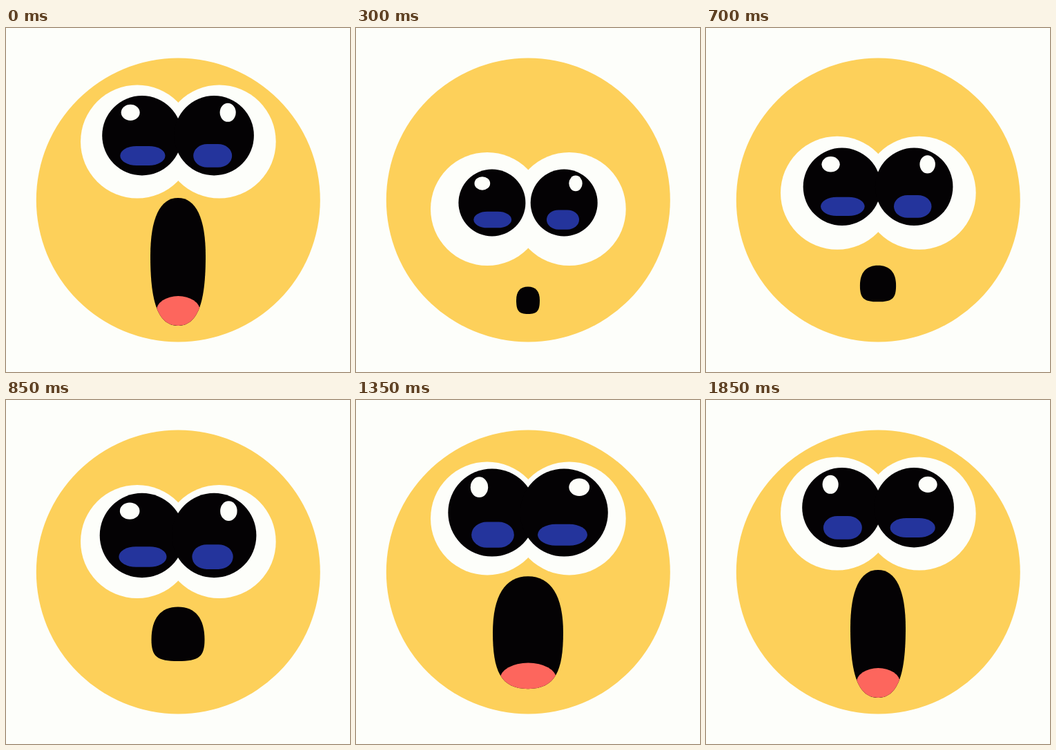
An HTML page that plays this animation: 498x498 px, repeating every 1900 ms.

```html
<!DOCTYPE html>
<html lang="en">
<head>
<meta charset="utf-8">
<title>Amazed face</title>
<style>
  html, body { margin: 0; width: 100%; height: 100%; overflow: hidden; background: #fdfefa; }
  svg { display: block; width: 100%; height: 100%; }
</style>
</head>
<body>
<svg id="stage" viewBox="0 0 498 498">
  <defs><clipPath id="mouthClip"><path id="mouthEdge"/></clipPath></defs>
  <circle cx="249.3" cy="249" r="205.5" fill="#fdd05a"/>
  <g id="whites" fill="#fdfefa">
    <circle cx="190" r="82"/>
    <circle cx="308.7" r="82"/>
  </g>
  <g id="pupils"></g>
  <path id="mouth" fill="#040204"/>
  <ellipse id="tongue" cx="249.3" fill="#fd665d" clip-path="url(#mouthClip)"/>
</svg>
<script>
const LOOP = 1900, STEP = 50, SWAP = 1350, MID = 249;
const byId = id => document.getElementById(id);

function set(node, attrs) {
  for (const name in attrs) node.setAttribute(name, attrs[name]);
}

function add(parent, tag, attrs) {
  const node = document.createElementNS('http://www.w3.org/2000/svg', tag);
  set(node, attrs);
  return parent.appendChild(node);
}

// One value per pose, at these times.
const times = [0, 150, 300, 500, 850, 1150, 1550, 1850];
const tracks = {
  whiteY:   [164.5, 220, 262, 276, 205, 180, 166.5, 164.5],
  pupilY:   [155.7, 211, 253, 267.5, 196, 171.5, 158, 155.7],
  pupilR:   [57.7, 52, 48.5, 49.5, 61.2, 63.8, 63, 57.7],
  top:      [246, 320, 374.5, 393, 299.5, 267, 248.5, 246],
  widest:   [330, 372, 394, 409, 347, 342, 332, 330],
  bottom:   [431, 410, 414, 424.5, 378, 397, 432, 431],
  half:     [40, 25, 17, 15, 38.5, 57, 43.3, 40],
  jaw:      [0.6, 0.68, 0.78, 0.78, 0.8, 0.77, 0.6, 0.6],
  tongueY:  [409.5, 421, 440, 440, 407, 397, 410, 409.5],
  tongueRx: [31.7, 28, 25, 25, 38, 45, 35, 31.7],
  tongueRy: [21.5, 21, 20, 20, 24, 24, 22, 21.5]
};

// Monotone cubic interpolation: flat at turning points, no overshoot.
function slopeAt(values, i) {
  if (i === 0 || i === values.length - 1) return 0;
  const before = (values[i] - values[i - 1]) / (times[i] - times[i - 1]);
  const after = (values[i + 1] - values[i]) / (times[i + 1] - times[i]);
  return before * after > 0 ? 2 * before * after / (before + after) : 0;
}

function sample(values, t) {
  if (t >= times[times.length - 1]) return values[values.length - 1];
  const i = times.findIndex((time, k) => t >= time && t < times[k + 1]);
  const span = times[i + 1] - times[i], u = (t - times[i]) / span;
  const blend = u * u * (3 - 2 * u);
  return values[i] + (values[i + 1] - values[i]) * blend
    + span * u * (1 - u) * (slopeAt(values, i) * (1 - u) - slopeAt(values, i + 1) * u);
}

const eyes = [
  { x: 196.9, shineX: -0.29, glowX: 0.017 },
  { x: 301.2, shineX: 0.346, glowX: -0.035 }
];
for (const eye of eyes) eye.group = add(byId('pupils'), 'g', {});
for (const eye of eyes) add(eye.group, 'circle', { r: 1, fill: '#040204' });
for (const eye of eyes) {
  eye.details = add(byId('pupils'), 'g', {});
  eye.shine = add(eye.details, 'ellipse', { cx: eye.shineX, cy: -0.578, fill: '#fdfefa' });
  eye.glow = add(eye.details, 'rect', { fill: '#24349c' });
}

function drawEye(eye, y, r, wide) {
  const place = `translate(${eye.x} ${y}) scale(${r})`;
  set(eye.group, { transform: place });
  set(eye.details, { transform: place });
  set(eye.shine, wide ? { rx: 0.234, ry: 0.2 } : { rx: 0.2, ry: 0.234 });
  const w = wide ? 1.13 : 0.97, h = wide ? 0.485 : 0.585;
  set(eye.glow, {
    x: eye.glowX - w / 2, y: 0.507 - h / 2, width: w, height: h, rx: w * 0.36, ry: h / 2
  });
}

function mouthPath({ top, widest, bottom, half, jaw }) {
  const left = MID - half, right = MID + half;
  const upper = widest - 0.65 * (widest - top);
  const lower = widest + jaw * (bottom - widest);
  const brow = 0.65 * half, chin = 0.78 * half;
  return `M${left} ${widest}
    C${left} ${upper} ${MID - brow} ${top} ${MID} ${top}
    C${MID + brow} ${top} ${right} ${upper} ${right} ${widest}
    C${right} ${lower} ${MID + chin} ${bottom} ${MID} ${bottom}
    C${MID - chin} ${bottom} ${left} ${lower} ${left} ${widest}Z`;
}

function draw(t) {
  const pose = {};
  for (const name in tracks) pose[name] = sample(tracks[name], t);
  for (const white of byId('whites').children) set(white, { cy: pose.whiteY });
  const swapped = t >= SWAP;
  eyes.forEach((eye, i) => drawEye(eye, pose.pupilY, pose.pupilR, (i === 0) !== swapped));
  const d = mouthPath(pose);
  set(byId('mouth'), { d });
  set(byId('mouthEdge'), { d });
  set(byId('tongue'), { cy: pose.tongueY, rx: pose.tongueRx, ry: pose.tongueRy });
}

let start;
function tick(now) {
  start ??= now;
  draw(Math.floor((now - start) % LOOP / STEP) * STEP);
  requestAnimationFrame(tick);
}
draw(0);
requestAnimationFrame(tick);
</script>
</body>
</html>
```
